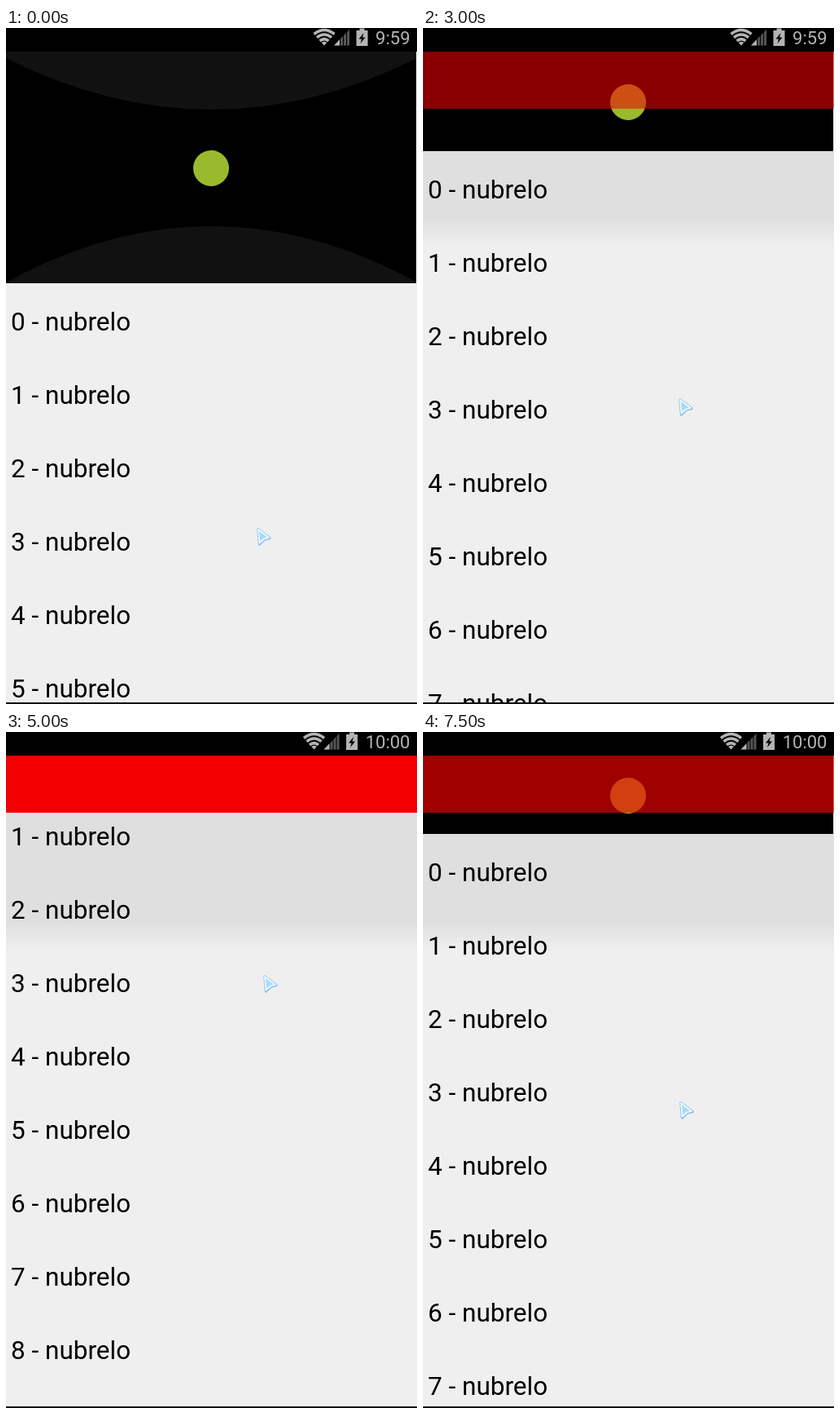
An HTML page for the animation above (8000 ms loop, 505 by 829 pixels).

```html
<!DOCTYPE html>
<html lang="en">
<head>
<meta charset="utf-8">
<title>Fading toolbar</title>
<style>
  html, body { margin: 0; width: 100%; height: 100%; overflow: hidden; background: #efefef; }
  svg { display: block; width: 100vw; height: 100vh; }
  text { font-family: Roboto, "Open Sans", sans-serif; }
  #rows { font-size: 31.5px; fill: #000; }
  #clock { font-size: 22px; fill: #b4b4b4; text-anchor: end; }
</style>
</head>
<body>
<svg viewBox="0 0 505 829" preserveAspectRatio="none">
  <defs>
    <linearGradient id="shade" x1="0" y1="0" x2="0" y2="1">
      <stop offset="0" stop-color="#dfdfdf"/>
      <stop offset=".8" stop-color="#dfdfdf"/>
      <stop offset="1" stop-color="#efefef"/>
    </linearGradient>
    <clipPath id="headerClip"><rect id="headerBox" y="29" width="504" height="284"/></clipPath>
    <clipPath id="barClip"><rect y="29" width="505" height="70"/></clipPath>
  </defs>

  <rect width="505" height="829" fill="#efefef"/>
  <rect id="shadow" y="99" width="505" height="168" fill="url(#shade)"/>
  <g id="rows"></g>

  <g clip-path="url(#headerClip)">
    <rect y="29" width="504" height="285" fill="#000"/>
    <g id="banner" fill="#111">
      <path id="topArc" d="M0 29V37Q252 163 505 37V29Z"/>
      <path d="M0 320V312Q252 174 505 312V320Z"/>
      <circle cx="252" cy="172" r="22" fill="#9aba2e"/>
    </g>
  </g>

  <g clip-path="url(#barClip)">
    <rect id="bar" y="29" width="505" height="70" fill="#f20000"/>
    <path id="glow" fill="#f00" fill-opacity=".06"/>
  </g>

  <rect width="505" height="29" fill="#000"/>
  <g id="icons">
    <g fill="none" stroke="#b4b4b4" stroke-width="3.6">
      <path d="M378.500 7.500Q391 -2.500 403.500 7.500"/>
      <path d="M382 11.700Q391 4.300 400 11.700"/>
      <path d="M385.600 15.800Q391 11.300 396.400 15.800"/>
    </g>
    <path d="M387.800 18Q391 15.600 394.200 18L391 21.500Z" fill="#b4b4b4"/>
    <path d="M403 21.500L410 14V21.500Z" fill="#b4b4b4"/>
    <path d="M411 21.500V13L414 10V21.500ZM415 21.500V9L418 6V21.500ZM419 21.500V5L422 2V21.500Z" fill="#555"/>
    <path d="M434.500 0.500H440.500V3H444.500V22H430.500V3H434.500Z" fill="#b4b4b4"/>
    <path d="M439.500 6L433.500 13.500H437L435.500 19L441.500 11.500H438Z" fill="#000"/>
  </g>
  <text id="clock" x="496.500" y="20"></text>

  <rect y="827" width="505" height="2" fill="#150c16"/>
  <g id="cursor" stroke-linejoin="round">
    <path d="M2 2L16 12.500L9.500 14L3.500 20Z" fill="#7fb9ee" stroke="#8fc2ef" stroke-width="3.400"/>
    <path d="M2 2L15 12L9 13.500L3.500 18.500Z" fill="#a9d9f8" stroke="#f4fbff" stroke-width="1.700"/>
  </g>
</svg>
<script>
const STEP = 500;
const ROW_HEIGHT = 90;
const scroll = [0, 0, 41, 73, 104, 133, 162, 205, 247, 288, 322, 322, 314, 272, 230, 188];
const pointerX = [308, 311, 311, 313, 314, 314, 314, 314, 314, 314, 316, 315, 315, 315, 315, 315];
const pointerY = [613, 609, 575, 543, 513, 483, 454, 411, 369, 328, 298, 303, 327, 369, 411, 453];

const el = id => document.getElementById(id);
const move = (id, x, y) => el(id).setAttribute('transform', `translate(${x} ${y})`);

for (let i = 0; i < 10; i++) {
  const row = document.createElementNS('http://www.w3.org/2000/svg', 'text');
  row.setAttribute('x', 6);
  row.setAttribute('y', 371 + i * ROW_HEIGHT);
  row.textContent = `${i} - nubrelo`;
  el('rows').append(row);
}

function draw(time) {
  const step = Math.floor(time / STEP) % scroll.length;
  const offset = scroll[step];

  move('rows', 0, -offset);
  move('banner', 0, -Math.round(offset / 2)); // parallax at half speed
  el('headerBox').setAttribute('height', Math.max(0, 284 - offset));
  el('shadow').setAttribute('visibility', offset ? 'visible' : 'hidden');
  el('topArc').setAttribute('visibility', offset ? 'hidden' : 'visible');
  el('bar').setAttribute('opacity', offset > 260 ? 1 : offset / 285);

  const edge = 25 + (offset - 41) * 0.25;
  const middle = 93 - (offset - 41) * 0.063;
  el('glow').setAttribute('d', `M0 20V${edge}Q252 ${2 * middle - edge} 505 ${edge}V20Z`);
  el('glow').setAttribute('visibility', offset > 0 && offset < 150 ? 'visible' : 'hidden');

  const late = step >= 8;
  el('clock').textContent = late ? '10:00' : '9:59';
  move('icons', late ? -12.5 : 0, 0);
  move('cursor', pointerX[step], pointerY[step]);
}

const start = performance.now();
function tick() {
  draw(performance.now() - start);
  requestAnimationFrame(tick);
}
tick();
</script>
</body>
</html>
```
